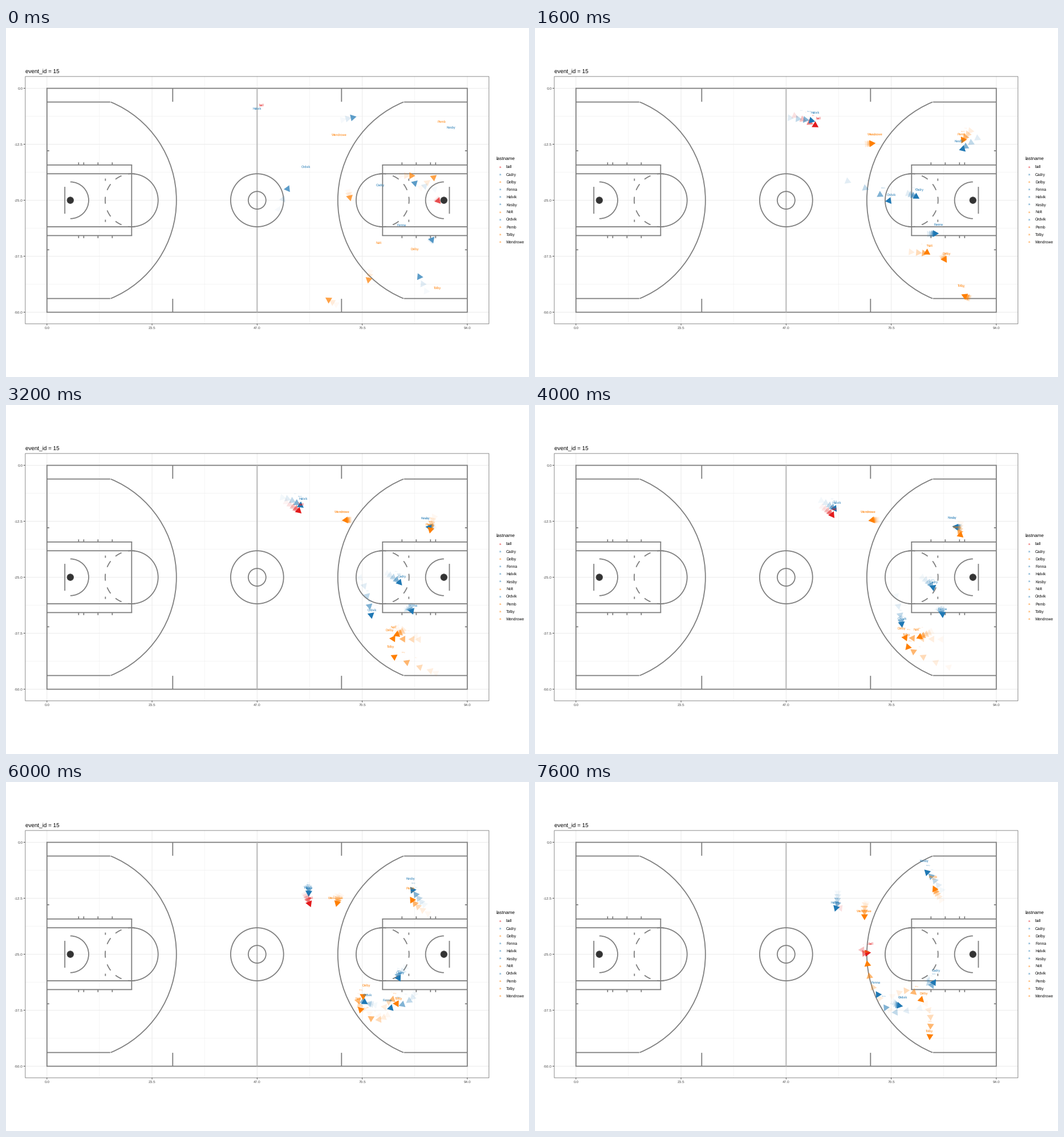
A matplotlib script for the animation above (8000 ms loop, 917x611 px).

```python
import math

import matplotlib.pyplot as plt
import numpy as np
from matplotlib.animation import FuncAnimation
from matplotlib.patches import Arc, Circle, Polygon, Rectangle

W, H, DPI = 917, 611, 100
FRAMES, INTERVAL = 20, 400
PX = 72 / DPI
RED, BLUE, ORANGE = "#e31a1c", "#1f78b4", "#ff7f00"
LINE, GRID = "#7f7f7f", "#ebebeb"

# Court geometry in pixels
FOOT = 7.84
LEFT, RIGHT, TOP, BOTTOM = 72, 809, 106, 498
MID_X, MID_Y = (LEFT + RIGHT) / 2, (TOP + BOTTOM) / 2
HOOP_X, FREE_THROW_X = 113, 220.5
KEY_RADIUS, ARC_RADIUS, CORNER = 46.4, 186, 172

# Markers
RADIUS, LEAN, LABEL_RISE = 6.9, 6.5, 15
FADE = (1, 0.56, 0.28, 0.13, 0.05)
CARRY_OVER = (0.72, 0.14, 0.04)
LABEL_GHOSTS = 3
KEY_FRAMES = (0, 4, 10, 13, 17, 19)

plt.rcParams["font.family"] = "Liberation Sans"
plt.rcParams["text.hinting"] = "none"
plt.rcParams["path.snap"] = False

fig = plt.figure(figsize=(W / DPI, H / DPI), dpi=DPI, facecolor="white")
ax = fig.add_axes([0, 0, 1, 1])
ax.set_xlim(0.2, W + 0.2)
ax.set_ylim(H + 0.4, 0.4)
ax.axis("off")


def line(x0, y0, x1, y1, color=LINE, width=1.8, z=2):
    ax.plot([x0, x1], [y0, y1], color=color, lw=width * PX, zorder=z,
            solid_capstyle="butt")


def text(x, y, s, size, color="black", ha="center", va="center_baseline", **kw):
    return ax.text(x, y, s, fontsize=size * PX, color=color, ha=ha, va=va, **kw)


def arc(x, r, middle, half):
    ax.add_patch(Arc((x, MID_Y), 2 * r, 2 * r, theta1=middle - half,
                     theta2=middle + half, color=LINE, lw=1.8 * PX, zorder=2))


def box(x, y, w, h, color, width):
    ax.add_patch(Rectangle((x, y), w, h, fill=False, ec=color, lw=width * PX, zorder=2))


def direction(degrees):
    a = np.radians(degrees)
    return np.stack([np.cos(a), np.sin(a)], axis=-1)


def bearing(step):
    return math.degrees(math.atan2(step[1], step[0]))


def glide(frames, points, n):
    """Smooth path through the points that never overshoots them."""
    t, p = np.array(frames, float), np.array(points, float)
    slope = np.diff(p, axis=0) / np.diff(t)[:, None]
    a, b = slope[:-1], slope[1:]
    inner = 2 * np.maximum(a * b, 0) * np.sign(a) / (np.abs(a + b) + 1e-9)
    tangent = np.vstack([slope[:1], inner, slope[-1:]])
    i = min(max(np.searchsorted(t, n) - 1, 0), len(t) - 2)
    h = t[i + 1] - t[i]
    u = (n - t[i]) / h
    ease = u * u * (3 - 2 * u)
    return (p[i] + ease * (p[i + 1] - p[i])
            + h * u * (1 - u) * ((1 - u) * tangent[i] - u * tangent[i + 1]))


class Player:
    """Runs through a few points; the marker leans back from its heading."""

    def __init__(self, name, color, carried, points, frames=KEY_FRAMES):
        self.name, self.color, self.carried = name, color, carried
        self.points, self.frames = points, frames

    def position(self, n):
        return glide(self.frames, self.points, n)

    def heading(self, n):
        return bearing(self.position(n) - self.position(n - 0.5))

    def marker(self, n):
        return self.position(n) - LEAN * direction(self.heading(n))

    def label(self, n):
        return self.position(n) - (0, LABEL_RISE)


PLAYERS = [
    Player("ball", RED, (758, 303),
           [(448, 151), (497, 174), (525, 198), (538, 227), (577, 300), (589, 299)],
           frames=(0, 4, 10, 16, 17, 19)),
    Player("Cadry", BLUE, (717, 272),
           [(656, 291), (674, 299), (699, 326), (689, 341), (697, 354), (703, 346)]),
    Player("Delby", ORANGE, (711, 259),
           [(717, 403), (722, 411), (643, 407), (618, 385), (657, 365), (682, 386)]),
    Player("Fenna", BLUE, (747, 371),
           [(694, 361), (708, 360), (715, 373), (702, 387), (626, 404), (598, 367)]),
    Player("Halvik", BLUE, (608, 157),
           [(440, 157), (491, 164), (529, 187), (531, 192), (530, 213), (526, 227)]),
    Player("Kesby", BLUE, (725, 436),
           [(781, 190), (744, 214), (732, 213), (720, 199), (697, 168), (683, 154)]),
    Player("Nolt", ORANGE, (566, 476),
           [(654, 392), (693, 397), (669, 409), (648, 417), (590, 354), (582, 313)]),
    Player("Ordvik", BLUE, (494, 282),
           [(526, 259), (625, 308), (644, 390), (631, 387), (640, 392), (645, 393)]),
    Player("Pemb", ORANGE, (750, 262),
           [(764, 180), (748, 202), (740, 230), (718, 214), (702, 190), (698, 182)]),
    Player("Tolby", ORANGE, (636, 441),
           [(757, 471), (748, 467), (652, 418), (677, 382), (694, 418), (692, 452)]),
    Player("Wendrowe", ORANGE, (603, 297),
           [(585, 203), (597, 202), (585, 203), (581, 212), (578, 227), (578, 242)]),
]


def draw_background():
    for i in range(9):
        x = LEFT + (RIGHT - LEFT) * i / 8
        y = TOP + (BOTTOM - TOP) * i / 8
        width = 0.5 if i % 2 else 1
        line(x, 85, x, 518, GRID, width, 0)
        line(34, y, 847, y, GRID, width, 0)
        if i % 2 == 0:
            line(x, 518, x, 521, "#333333", 0.9)
            line(31, y, 34, y, "#333333", 0.9)
            text(x, 525.5, f"{11.75 * i:.1f}", 6.5, "#4d4d4d")
            text(29.8, y + 0.4, f"{0 - 6.25 * i:.1f}", 6.5, "#4d4d4d", "right")
    box(34, 85.3, 813, 433, "#7f7f7f", 0.9)
    text(33.7, 79.2, "event_id = 15", 9.9, ha="left", va="baseline")


def draw_half(flip):
    """One end of the court, mirrored about the halfway line when flipped."""
    def mirror(x):
        return 2 * MID_X - x if flip else x

    def seg(x0, y0, x1, y1):
        line(mirror(x0), y0, mirror(x1), y1)

    outward = 180 if flip else 0
    lane, paint = KEY_RADIUS, 61.8
    for side in (-1, 1):
        def across(x0, dy, x1):
            seg(x0, MID_Y + side * dy, x1, MID_Y + side * dy)

        def along(x, near, far):
            seg(x, MID_Y + side * near, x, MID_Y + side * far)

        across(LEFT, CORNER, 183)
        across(LEFT, lane, FREE_THROW_X)
        across(LEFT, paint, FREE_THROW_X + 0.9)
        across(LEFT, 86.7, LEFT + 4)
        along(292.5, 172.5, 196)
        along(174.5, 34, 38)
        for x in (127.5, 136.5, 161.5, 186.5):
            along(x, paint, paint + 4.5)
    seg(FREE_THROW_X, MID_Y - paint, FREE_THROW_X, MID_Y + paint)
    seg(LEFT + 4 * FOOT, MID_Y - 3 * FOOT, LEFT + 4 * FOOT, MID_Y + 3 * FOOT)

    arc(mirror(HOOP_X), ARC_RADIUS, outward, math.degrees(math.asin(CORNER / ARC_RADIUS)))
    arc(mirror(HOOP_X), 4.1 * FOOT, outward, 90)
    arc(mirror(FREE_THROW_X), KEY_RADIUS, outward, 90)
    for a in range(-90, 91, 30):
        arc(mirror(FREE_THROW_X), KEY_RADIUS, outward + 180 + a, 7.5)
    ax.add_patch(Circle((mirror(HOOP_X), MID_Y), 5.8, fc="#333333", ec="#4d4d4d",
                        lw=0.8 * PX, zorder=3))


def draw_court():
    box(LEFT, TOP, RIGHT - LEFT, BOTTOM - TOP, LINE, 1.8)
    line(MID_X, TOP, MID_X, BOTTOM, "#b8b8b8", 2)
    for r in (KEY_RADIUS, KEY_RADIUS / 3):
        arc(MID_X, r, 0, 180)
    draw_half(False)
    draw_half(True)


def draw_legend():
    text(859.7, 231.3, "lastname", 8.2, ha="left", va="baseline")
    for i, p in enumerate(PLAYERS):
        y = 243.2 + 13.15 * i
        text(866.7, y, "a", 5.5, p.color)
        text(877.2, y, p.name, 6.8, ha="left")


def triangle(center, heading, color, alpha, z):
    corners = center + RADIUS * direction(heading + np.array([0, 120, 240]))
    return ax.add_patch(Polygon(corners, fc=color, ec="none", alpha=alpha, zorder=z))


draw_background()
draw_court()
draw_legend()
moving = []


def draw_carried(n):
    """Markers left from before the loop, gone after three frames."""
    rng = np.random.default_rng(4)
    for p in PLAYERS:
        drift = rng.normal((4, 0), 8)
        for age, alpha in enumerate(CARRY_OVER[n:]):
            moving.append(triangle(p.carried + drift * age, bearing(-drift),
                                   p.color, alpha, 4))


def update(n):
    while moving:
        moving.pop().remove()
    draw_carried(n)
    for age in range(min(n, len(FADE) - 1), -1, -1):
        then, alpha = n - age, FADE[age]
        for p in PLAYERS:
            if then > 0:
                moving.append(triangle(p.marker(then), p.heading(then), p.color,
                                       alpha, 10 - age))
            if age < LABEL_GHOSTS:
                moving.append(text(*p.label(then), p.name, 5.6 / (1 + age), p.color,
                                   va="center", alpha=alpha, zorder=14 - age))
    return moving


anim = FuncAnimation(fig, update, frames=FRAMES, interval=INTERVAL,
                     init_func=lambda: update(0), repeat=True, repeat_delay=0,
                     blit=False)
plt.show()
```
